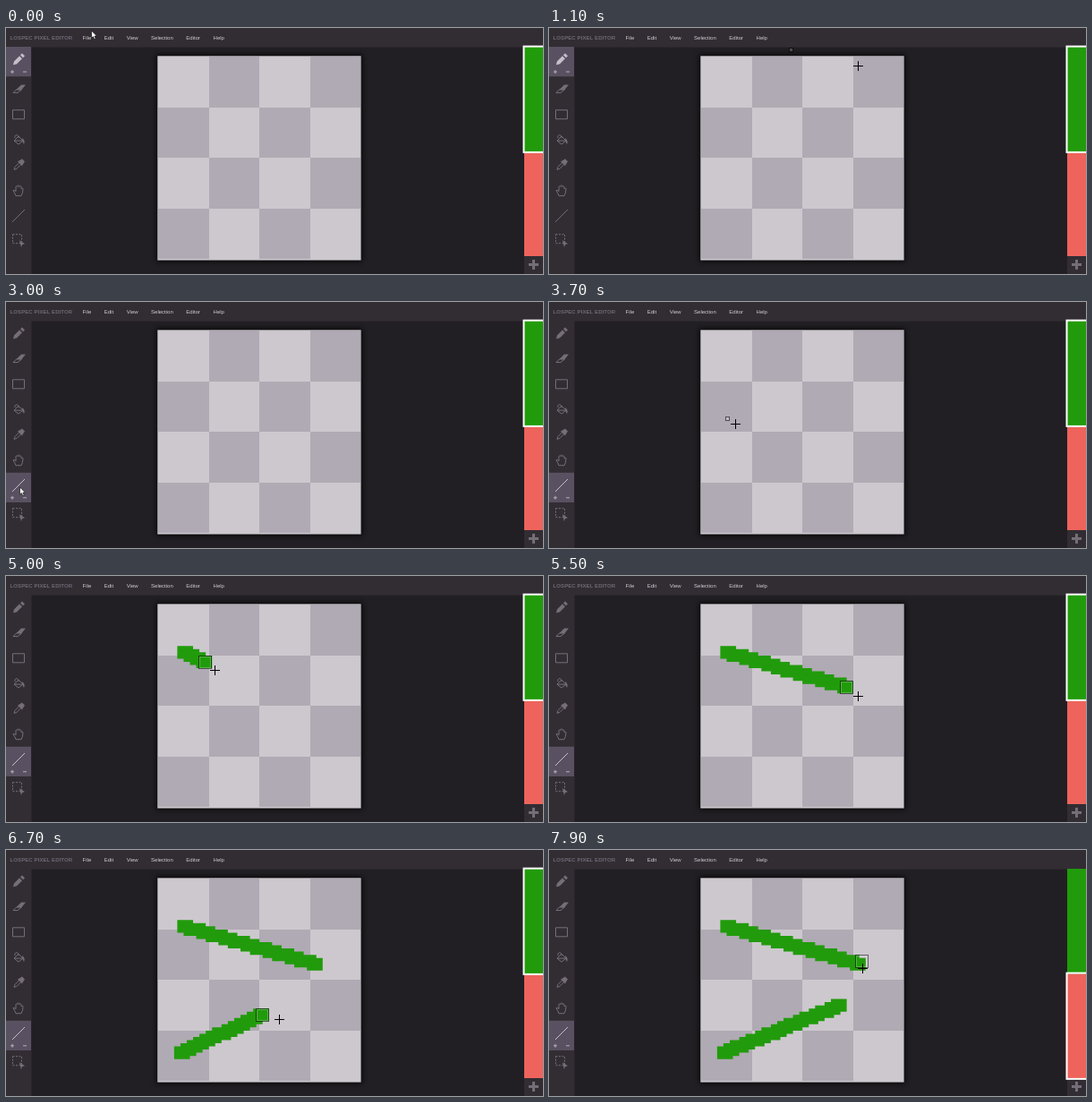
Animation of 600 by 275 pixels, one loop 8000 ms. Source, as an HTML page:

```html
<!DOCTYPE html>
<html>
<head>
<meta charset="utf-8">
<style>
  html, body { margin: 0; width: 100%; height: 100%; overflow: hidden; background: #221f24; }
  svg { display: block; }
  text { font: 6px "Liberation Sans", Arial, sans-serif; fill: #d3ced6; }
  .title { font-weight: bold; letter-spacing: .1px; fill: #6f6875; }
  .tool { fill: none; stroke: #756e79; color: #756e79; }
  .tool.on { stroke: #c6bfca; color: #c6bfca; }
  .solid { fill: currentColor; stroke: none; }
</style>
</head>
<body>
<svg width="600" height="275" viewBox="0 0 600 275">
  <defs>
    <filter id="blur" x="-20%" y="-20%" width="140%" height="140%"><feGaussianBlur stdDeviation="3"/></filter>
  </defs>
  <rect x="168" y="30" width="230" height="231" opacity=".8" filter="url(#blur)"/>
  <rect x="169.300" y="31.300" width="227.300" height="228.300" fill="#cdc8ce"/>
  <path id="squares" fill="#b0aab4" shape-rendering="crispEdges"/>
  <path id="ink" fill="#219b0b"/>

  <rect width="600" height="21.500" fill="#322d33"/>
  <rect y="21" width="28.500" height="254" fill="#322d33"/>
  <text class="title" x="4.500" y="13.200">LOSPEC PIXEL EDITOR</text>
  <text id="menu" x="71" y="13.200"></text>
  <rect id="active" width="28" height="33.200" fill="#595161"/>
  <g id="tools"></g>
  <path id="sizer" d="M5 0h4M7-2v4M19 0h4" stroke="#b5aeb9" fill="none"/>

  <rect x="579" y="21" width="21" height="117.500" fill="#219b0b"/>
  <rect x="579" y="138.500" width="21" height="116.500" fill="#ee645c"/>
  <rect x="579" y="255" width="21" height="20" fill="#322d33"/>
  <path d="M584 264.500h11M589.500 259v11" stroke="#756e79" stroke-width="3"/>
  <rect id="chosen" x="578.500" width="24" height="118.300" fill="none" stroke="#fff" stroke-width="2"/>

  <g id="brush" fill="none">
    <rect id="outer" stroke="#000" stroke-opacity=".55"/>
    <rect id="inner" stroke="#fff" stroke-opacity=".25"/>
  </g>
  <path id="cross" d="M-5 .5h11M.5-5v11" stroke="#000"/>
  <path id="arrow" d="M-.5 0v8.200l1.900-1.700 1.300 3 1.500-.7-1.300-2.800h2.600z" fill="#fff" stroke="#000" stroke-width=".6"/>
</svg>
<script>
const $ = id => document.getElementById(id);
const set = (el, attrs) => { for (const k in attrs) el.setAttribute(k, attrs[k]); };
const show = (el, on) => set(el, { visibility: on ? "visible" : "hidden" });
const box = (x, y, side) => `M${x} ${y}h${side}v${side}h${-side}z`;
const CELL = 226 / 64, LEFT = 170.2, TOP = 32.4;
const SQUARE = 16 * CELL, ROW = 28.3, EXTRA = 4.9;
const PENCIL = 0, LINE = 6;

let squares = "";
for (let y = 0; y < 4; y++)
  for (let x = (y + 1) % 2; x < 4; x += 2) squares += box(LEFT + x * SQUARE, TOP + y * SQUARE, SQUARE);
set($("squares"), { d: squares });

$("menu").innerHTML = ["File", "Edit", "View", "Selection", "Editor", "Help"]
  .map(name => `<tspan dx="14.55">${name}</tspan>`).join("");

const icons = [
  `<path class="solid" d="M-6 6l1-4 6-6 3 3-6 6zM2-5l2-2 3 3-2 2z"/>`,
  `<path d="M-6 4l4-4h6l-5 4z"/><path class="solid" d="M-3 1l6-6h5L3 1z"/>`,
  `<path d="M-6.500-5h13v10h-13z"/>`,
  `<path d="M-5 1l5-5 5 5-5 4zM-5 1H5M-4-2C-5-7 1-6 0-2"/><path class="solid" d="M4-2q4 3 2 7-2-3-2-7z"/>`,
  `<path d="M-5 5l1-3 5-5 2 2-5 5z"/><path class="solid" d="M-1-4l2-1 3-2 3 3-2 3-1 2z"/>`,
  `<path d="M-3 6q-1-3-3-6 1-1 3 1v-5q1-2 2 0v-1q1-2 2 0v1q1-2 2 0v2q2-1 2 0 0 5-2 8z"/>`,
  `<path d="M-7 7L7-7"/>`,
  `<path d="M-6.500-7.500h10v10h-10z" stroke-dasharray="2 1.500"/><path class="solid" d="M1-1l6 4-3 1-1 3z"/>`
];
$("tools").innerHTML = icons.map(shapes => `<g class="tool">${shapes}</g>`).join("");

function selectTool(n) {
  [...$("tools").children].forEach((el, i) => set(el, {
    transform: `translate(14 ${35.2 + i * ROW + (i > n ? EXTRA : 0)})`,
    class: i === n ? "tool on" : "tool"
  }));
  set($("active"), { y: 21 + n * ROW });
  set($("sizer"), { transform: `translate(0 ${49 + n * ROW})` });
}

// Turning points of the pointer: [tick, x, y], one tick is 100 ms
const route = [
  [1, 96, 3], [5, 237, 3], [8, 101, 3], [9, 101, 3], [13, 588, 80], [16, 481, 9],
  [18, 227, 127], [20, 214, 165], [24, 84, 208], [29, 16, 207], [31, 16, 207],
  [35, 178, 136], [37, 208, 136], [44, 200, 128], [46, 196, 92], [48, 201, 92],
  [50, 233, 105], [55, 345, 134], [57, 348, 135], [62, 194, 233], [64, 198, 233],
  [66, 277, 193], [67, 305, 189], [69, 334, 176.5], [71, 500, 106], [73, 588, 190],
  [76, 290, 138], [78, 351, 130], [79, 350, 132]
];

function pointer(t) {
  const i = route.findIndex(p => p[0] > t);
  if (i < 1) return (i ? route[route.length - 1] : route[0]).slice(1);
  const [t0, x0, y0] = route[i - 1], [t1, x1, y1] = route[i], f = (t - t0) / (t1 - t0);
  return [x0 + (x1 - x0) * f, y0 + (y1 - y0) * f];
}

// The brush trails the pointer and snaps to cells; it grows from 1 to 4 cells
const brushSize = t => Math.max(1, Math.min(4, Math.floor((t - 35) / 2)));
function brushCell(t) {
  const [x, y] = pointer(t - .6), half = brushSize(t) / 2;
  return [Math.round((x - LEFT) / CELL - half), Math.round((y - 6.5 - TOP) / CELL - half)];
}

function stroke(t, start, end) {
  if (t < start) return "";
  const [x0, y0] = brushCell(start), [x1, y1] = brushCell(Math.min(t, end));
  const n = Math.max(Math.abs(x1 - x0), Math.abs(y1 - y0), 1);
  let d = "";
  for (let i = 0; i <= n; i++) {
    const x = x0 + Math.round((x1 - x0) * i / n), y = y0 + Math.round((y1 - y0) * i / n);
    d += box(LEFT + x * CELL, TOP + y * CELL, 4 * CELL);
  }
  return d;
}

function draw(now) {
  const t = Math.floor(now % 8000 / 100);
  const [x, y] = pointer(t).map(Math.round);
  const onBoard = x > 170 && x < 396 && y > 32 && y < 259;
  selectTool(t < 30 ? PENCIL : LINE);
  set($("chosen"), { y: t < 73 ? 20.6 : 137.6 });
  set($("ink"), { d: stroke(t, 48, 57) + stroke(t, 63, 69) });

  for (const id of ["cross", "arrow"]) {
    set($(id), { transform: `translate(${x} ${y})` });
    show($(id), (id === "cross") === onBoard);
  }
  const [cx, cy] = brushCell(t), side = Math.round(brushSize(t) * CELL);
  const bx = Math.round(LEFT + cx * CELL) - .5, by = Math.round(TOP + cy * CELL) + .5;
  set($("outer"), { x: bx, y: by, width: side, height: side });
  set($("inner"), { x: bx + 1, y: by + 1, width: side - 2, height: side - 2 });
  show($("brush"), onBoard);
}

const begin = performance.now();
(function loop() {
  draw(performance.now() - begin);
  requestAnimationFrame(loop);
})();
</script>
</body>
</html>
```
